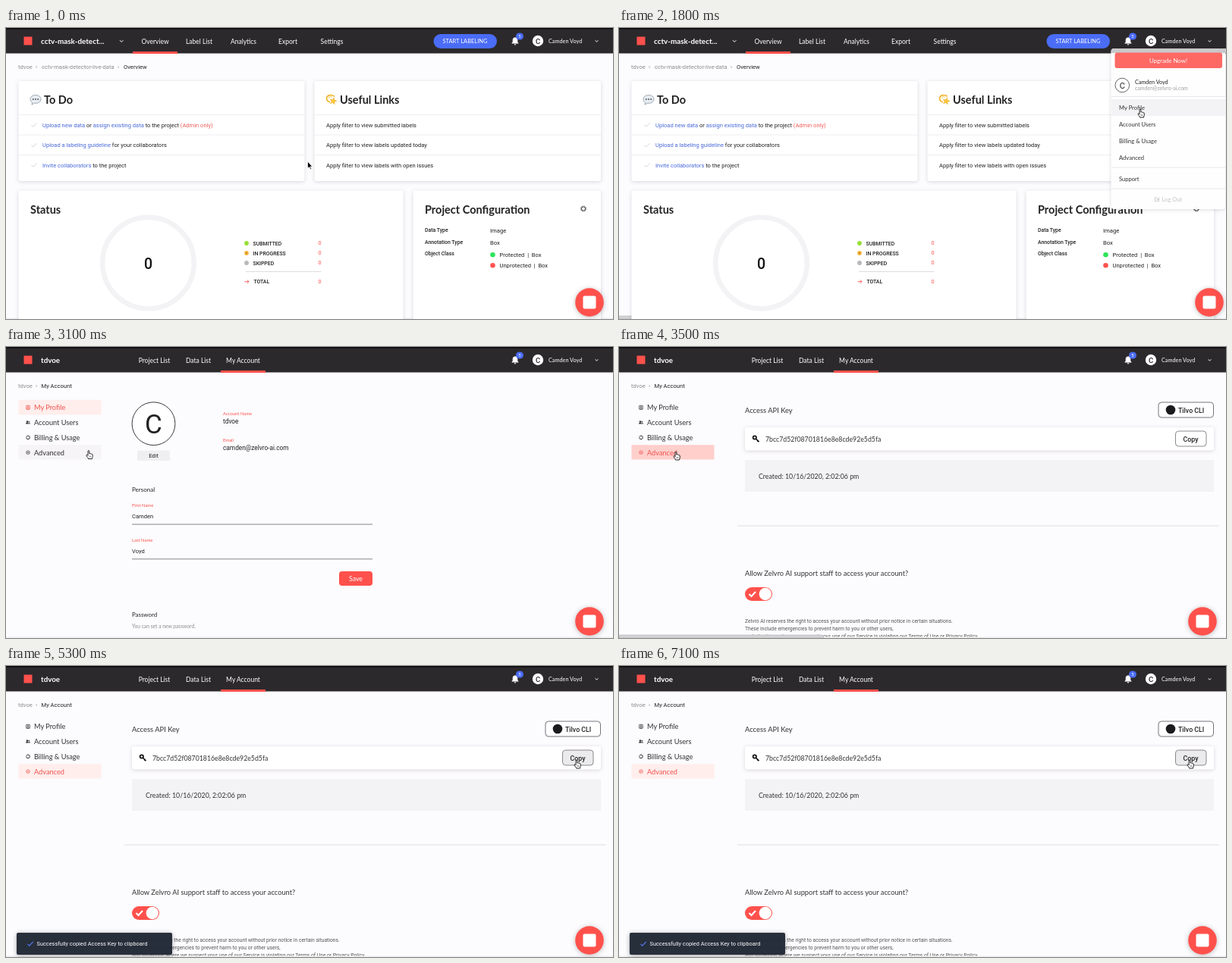
Recreate the animation shown at these times as an HTML page. Size 800 by 384 pixels, loop 7200 ms.

```html
<!DOCTYPE html>
<html lang="en">
<head>
<meta charset="utf-8">
<title>Access key walkthrough</title>
<style>
html, body { margin: 0; width: 100%; height: 100%; overflow: hidden; background: #fcfbfd; }
svg { display: block; width: 800px; height: 384px; }
text { white-space: pre; }
.l { font-family: Lato, sans-serif; }
.r { font-family: Roboto, sans-serif; }
.card { fill: #fff; filter: drop-shadow(0 1px 2.5px rgba(40, 30, 60, .17)); }
</style>
</head>
<body>
<svg id="stage" viewBox="0 0 800 384"></svg>
<script>
const RED = '#ff514c', BLUE = '#4a6cf7', LINK = '#4768d8', INK = '#222', GREY = '#8d8b90';
const PERSON = 'Camden Voyd', USER = 'tdvoe', MAIL = 'camden@zelvro-ai.com', FIRM = 'Zelvro AI';

// y is the middle of the capitals
const text = (cls, x, y, s, size, fill = INK, more = '') =>
  `<text class="${cls}" x="${x}" y="${(y + size * .36).toFixed(2)}" font-size="${size}" fill="${fill}" ${more}>${s}</text>`;
const lato = (...a) => text('l', ...a);
const robo = (...a) => text('r', ...a);
const MID = 'text-anchor="middle"', BOLD = 'font-weight="700"', MED = 'font-weight="500"';
const rect = (x, y, w, h, fill, r = 0, more = '') =>
  `<rect x="${x}" y="${y}" width="${w}" height="${h}" rx="${r}" fill="${fill}" ${more}/>`;
const card = (x, y, w, h, r = 3) => rect(x, y, w, h, '#fff', r, 'class="card"');
const circ = (x, y, r, fill, more = '') => `<circle cx="${x}" cy="${y}" r="${r}" fill="${fill}" ${more}/>`;
const path = (d, stroke, w = 1, fill = 'none', more = '') =>
  `<path d="${d}" stroke="${stroke}" stroke-width="${w}" fill="${fill}" ${more}/>`;
const rule = (x1, x2, y, color = '#eeedf0') => path(`M${x1} ${y}H${x2}`, color);
const span = (s, fill) => `<tspan fill="${fill}">${s}</tspan>`;
const group = (id, body) => `<g id="${id}">${body}</g>`;
const tabs = (list, on) => list.map(([x, s]) => lato(x, 17.5, s, 8.5, '#fff', MID)).join('') +
  rect(on, 31, 59, 3, RED);

function header() {
  return rect(0, 0, 800, 33.5, '#2c292c') + rect(0, 0, 800, 1.5, '#08070a') +
    rect(23.5, 11.5, 11, 11, RED) +
    path('M666.5 20.5V20l1.2-1.4V16q0-3.3 3.3-3.8 3.3.5 3.3 3.8v2.6l1.2 1.4v.5Z', 'none', 0, '#fff') +
    path('M669.6 21.2h2.8q-.3 1.3-1.4 1.3t-1.4-1.3Z', 'none', 0, '#fff') +
    rect(672, 6.5, 10, 9, BLUE, 4.5) + lato(677, 11, '5', 6, '#fff', MID) +
    circ(701, 17, 7.2, '#fff') + robo(701, 17.1, 'C', 9.5, INK, MID + MED) +
    lato(715, 17.5, PERSON, 7.3, '#fff') + path('M776.6 16.3l1.9 1.9 1.9-1.9', '#fff');
}

function bubble() {
  return path('M39 88.5c4 0 7 2.3 7 5.4s-3 5.4-7 5.4l-1.7-.1-3.3 2 .6-2.9c-1.700-1-2.600-2.500-2.600-4.400 0-3.100 3-5.400 7-5.400Z',
    '#8b97a3', .8, '#e8edf2') + [35.8, 39, 42.2].map(x => circ(x, 94, 1.05, '#56606a')).join('');
}

function dizzy() {
  let d = '';
  for (let i = 0; i < 10; i++) {
    const a = i * Math.PI / 5 - 1.35, r = i % 2 ? 2.1 : 4.8;
    d += `${i ? 'L' : 'M'}${(431.2 + r * Math.cos(a)).toFixed(1)} ${(96.5 + r * Math.sin(a)).toFixed(1)}`;
  }
  return path('M433 90.500c-3-3-9-2.500-10.200 1-.8 3 1.200 5.500 4.200 6.500', '#f2b632', 1.7) +
    path('M430 91.500c-2-1.300-4.500-.8-4.700 1', '#f6d371', 1.2) + path(d + 'Z', '#e2a42c', .5, '#fbc93b');
}

function overview() {
  const todo = [
    span('Upload new data', LINK) + ' or ' + span('assign existing data', LINK) + ' to the project ' + span('(Admin only)', '#ee5b58'),
    span('Upload a labeling guideline', LINK) + ' for your collaborators',
    span('Invite collaborators', LINK) + ' to the project'];
  const links = ['submitted labels', 'labels updated today', 'labels with open issues'];
  const rows = [128, 154.5, 181];
  const states = [['SUBMITTED', '#98df35'], ['IN PROGRESS', '#f7b742'], ['SKIPPED', '#b9b8bc']];
  const config = [['Data Type', 'Image'], ['Annotation Type', 'Box'], ['Object Class', '']];
  const classes = [['Protected', '#2fe45b'], ['Unprotected', '#ff5451']];
  return lato(46, 17.5, 'cctv-mask-detect...', 9.9, '#fff', BOLD) +
    path('M150 16.200l2.200 2.200 2.200-2.200', '#fff') +
    tabs([[196.5, 'Overview'], [254.5, 'Label List'], [313, 'Analytics'], [371.5, 'Export'], [429.5, 'Settings']], 167) +
    rect(563.5, 8, 83.5, 19, BLUE, 9.5) + lato(605, 17.5, 'START LABELING', 7.5, '#fff', MID) +
    robo(16, 51.5, USER, 7.6, GREY) + robo(39, 51, '›', 7.6, GREY) +
    robo(47, 51.5, 'cctv-mask-detector-live-data', 7.6, GREY) + robo(147, 51, '›', 7.6, GREY) +
    robo(155, 51.5, 'Overview', 7.6) +
    card(16.5, 70, 377, 132) + card(406.5, 70, 377.5, 132) +
    bubble() + lato(50, 95, 'To Do', 14.5, INK, BOLD) +
    dizzy() + lato(440, 95, 'Useful Links', 14.5, INK, BOLD) +
    rows.map((y, i) => rule(16.5, 393.5, y - 13.5) + rule(406.5, 784, y - 13.5) +
      path(`M33.500 ${y}l2.300 2.300 4.700-4.700`, '#d5d4d8') + robo(48, y, todo[i], 7.55) +
      robo(422, y, 'Apply filter to view ' + links[i], 7.55)).join('') +
    card(16.5, 214.5, 507, 190) + card(536.5, 214.5, 247.5, 190) +
    lato(32, 239.5, 'Status', 14.5, INK, BOLD) +
    circ(187.5, 310, 60.3, 'none', 'stroke="#f3f3f5" stroke-width="6.5"') +
    robo(187.5, 311, '0', 19.5, '#111', MID + MED) +
    states.map(([s, c], i) => circ(317, 284 + i * 13, 2.9, c) +
      robo(325.5, 284.3 + i * 13, s, 6.9, INK, MED) + robo(413.5, 283.7 + i * 13, '0', 7.2, RED, MID)).join('') +
    circ(317, 297, 1, '#b5781b') + rule(316, 415.5, 321.5, '#dddce0') +
    path('M314.500 334.700h5.500m-2.200-2.200 2.200 2.200-2.200 2.200', RED, .9) +
    robo(326.5, 335, 'TOTAL', 6.9, INK, MED) + robo(413.5, 334.7, '0', 7.2, RED, MID) +
    lato(552, 239.5, 'Project Configuration', 14.5, INK, BOLD) +
    circ(761, 238.5, 2.6, 'none', 'stroke="#666" stroke-width="1.300"') +
    circ(761, 238.5, 3.6, 'none', 'stroke="#666" stroke-width="1" stroke-dasharray="1.400 1.427"') +
    config.map(([k, v], i) => robo(552, 266.8 + i * 15.6, k, 6.9, INK, MED) + robo(638, 267.7 + i * 15.6, v, 7.7)).join('') +
    classes.map(([s, c], i) => circ(641.5, 299.2 + i * 14, 3.3, c) +
      robo(650.5, 299.4 + i * 14, s + '\u00a0 |\u00a0 Box', 7.6)).join('');
}

function menu() {
  const items = [['My Profile', 105.5], ['Account Users', 127.5], ['Billing & Usage', 149.5], ['Advanced', 171.5], ['Support', 198.8]];
  return rect(648.5, 27, 150.5, 212, '#fff', 4, 'class="card" fill-opacity=".96"') +
    path('M648.500 33v-2q0-4 4-4H800v6Z', 'none', 0, '#c9c8ca') +
    rect(653.5, 32.5, 141.5, 20.5, '#ff6964', 3) + lato(724, 43, 'Upgrade Now!', 7.9, '#fff', MID) +
    circ(663.3, 75.5, 9.3, '#fff', 'stroke="#555" stroke-width=".9"') + robo(663.3, 75.6, 'C', 11, INK, MID) +
    lato(680, 71, PERSON, 7.2) + lato(680, 80, MAIL, 6.9, '#a09fa3') +
    rule(648.5, 799, 90.5, '#e8e7ea') + rect(649, 94, 150, 22, '#f3f2f4', 0, 'id="pick"') +
    items.map(([s, y]) => lato(659, y, s.replace('&', '&amp;'), 7.6, '#333')).join('') +
    rule(648.5, 799, 184, '#e8e7ea') + rule(648.5, 799, 212, '#e8e7ea') +
    path('M709 223.500h-2.500v5h5v-5M708 226h3m-1.200-1.200 1.200 1.200-1.200 1.200', '#c4c3c7', .8) +
    lato(715.5, 226.3, 'Log Out', 7.6, '#c4c3c7');
}

const SIDE = ['My Profile', 'Account Users', 'Billing & Usage', 'Advanced'];
const sideY = i => 79.8 + i * 19.8;

function account() {
  return lato(46, 17.5, USER, 9.8, '#fff', BOLD) +
    tabs([[195.5, 'Project List'], [253.5, 'Data List'], [312.5, 'My Account']], 283) +
    robo(16, 51.5, USER, 7.6, GREY) + robo(39, 51, '›', 7.6, GREY) + robo(46.5, 51.5, 'My Account', 7.6) +
    group('side', '');
}

function sidebar(on, hover) {
  return SIDE.map((s, i) => {
    const y = sideY(i), c = i === on ? '#f0534f' : '#333';
    const bg = i === on ? (i === hover ? '#ffcfcc' : '#ffeeec') : i === hover ? '#f6f4f6' : '';
    const icon = [
      rect(26.7, y - 2.5, 4.6, 5, 'none', .5, `stroke="${c}" stroke-width=".8"`) + circ(29, y - .6, .9, c) + rect(27.6, y + .8, 2.8, 1, c),
      circ(28, y - 1.1, 1.2, c) + circ(30.4, y - 1, .9, c) + path(`M26 ${y + 2}q0-2 2-2t2 2Zm4.500 0h1.500q0-1.600-1.800-1.800Z`, 'none', 0, c),
      circ(29, y, 2.3, 'none', `stroke="${c}" stroke-width="1" stroke-dasharray="6.500 .7"`),
      circ(29, y, 2.3, 'none', `stroke="${c}" stroke-width=".7"`) + path(`M27.600 ${y}h2.800`, c, .9)][i];
    return (bg ? rect(16.5, y - 10, 109, 19.4, bg, 1) : '') + icon + lato(37, y + .3, s.replace('&', '&amp;'), 9.2, c);
  }).join('');
}

function profile() {
  const field = (y, k, v) => lato(166, y, k, 5.9, RED) + robo(166, y + 14.5, v, 7.6) + rule(166, 483, y + 25.3, '#858388');
  const [first, last] = PERSON.split(' ');
  return circ(194.5, 101.2, 28.4, '#fff', 'stroke="#3c3a3e" stroke-width="1" class="ring"') +
    robo(194.5, 101.4, 'C', 35, INK, MID) +
    rect(173, 136.5, 43, 13.5, '#efeef1', 1.5) + robo(194.5, 143.3, 'Edit', 7.5, INK, MID) +
    lato(286, 87.5, 'Account Name', 5.9, RED) + robo(286, 98.3, USER, 8.3) +
    lato(286, 122.5, 'Email', 5.9, RED) + robo(286, 133, MAIL, 8.3) +
    lato(166, 188, 'Personal', 8) + field(208.7, 'First Name', first) + field(254.5, 'Last Name', last) +
    rect(439, 296, 44, 19, RED, 4, 'class="save"') + lato(461, 306, 'Save', 8.8, '#fff', MID) +
    lato(166, 353.3, 'Password', 7.9) + lato(166, 368.5, 'You can set a new password.', 6.7, GREY);
}

function advanced() {
  const note = [`${FIRM} reserves the right to access your account without prior notice in certain situations.`,
    'These include emergencies to prevent harm to you or other users,',
    'and situations where we suspect your use of our Service is violating our Terms of Use or Privacy Policy.'];
  return lato(166, 84, 'Access API Key', 9.4, '#333') +
    rect(711, 73, 72.5, 20, '#fff', 4, 'stroke="#77757a"') + circ(727, 83, 6.3, '#1b1a1c') +
    robo(737, 83.5, 'Tilvo CLI', 8.8, INK, MED) +
    card(166, 106, 618, 30.5) +
    circ(178.8, 119.5, 2.2, 'none', 'stroke="#111" stroke-width="1.700"') + path('M180.300 121l4.200 4.200m-2.300-.5 1.400-1.400', '#111', 1.7) +
    lato(193, 122, '7bcc7d52f08701816e8e8cde92e5d5fa', 8.75, '#333') +
    rect(733.5, 111, 40.5, 20, '#fff', 4, 'id="copy" stroke="#8b898e"') + robo(753.5, 121.5, 'Copy', 8.8, INK, MID + MED) +
    rect(166, 149, 618, 42, '#f3f2f4', 1) + lato(184, 171, 'Created: 10/16/2020, 2:02:06 pm', 8.8, '#333') +
    rule(156, 791, 236, '#dfdee1') +
    lato(166, 298.3, `Allow ${FIRM} support staff to access your account?`, 9.3, '#333') +
    rect(166, 317, 36, 18, RED, 9) + circ(192.8, 326, 8.2, '#fff') + path('M171.500 326l3 3 5.500-6', '#fff', 2.1) +
    note.map((s, i) => robo(166, 361.2 + i * 10, s, 6.75, '#555')).join('');
}

const ARROW = path('M0 0V9.200L2.100 7.400 3.600 10.600 5 10 3.600 6.900H6.300Z', '#fff', .8, '#000', 'stroke-linejoin="round"');
const HAND = path('M-.9 1Q-.9 0 0 0T.9 1V4Q1.700 3.400 2.500 4.200 3.300 3.800 3.900 4.700 5.300 4.500 5.300 5.900V7.800Q5.300 9 4.600 9.900V11H-.5V10.200Q-1.500 9.300-2.900 6.700-3.200 5.900-2.500 5.700-1.800 5.500-.9 6.700Z',
  '#111', .9, '#fff', 'stroke-linejoin="round"') + path('M1.200 7v2M2.800 7v2', '#111', .5);

const stage = document.getElementById('stage');
stage.innerHTML = rect(0, 0, 800, 384, '#fcfbfd') +
  group('overview', '') + group('account', '') + group('profile', profile()) + group('advanced', advanced()) +
  rect(0, 382.5, 800, 1.5, '#efeef0') +
  group('status', path('M0 380H267q3 0 3 4H0Z', '#b5b4b8', .6, '#d3d2d5')) +
  group('toast', rect(14, 352, 205, 29, '#232b38', 2, 'style="filter:drop-shadow(0 1px 3px rgba(0,0,0,.35))"') +
    path('M28.500 366.800l2.300 2.300 5-5.300', '#5376f5', 1.2) + robo(40.5, 366.8, 'Successfully copied Access Key to clipboard', 7.4, '#fff')) +
  group('top', header()) + group('heads', '') + group('menu', menu()) +
  group('chat', circ(769, 362, 18.8, RED, 'style="filter:drop-shadow(0 1px 3px rgba(0,0,0,.25))"') + rect(760.5, 353.5, 17, 17, '#fff', 2)) +
  group('arrow', ARROW) + group('hand', HAND);

const el = id => document.getElementById(id);
// page groups carry their own header text, so they sit above the bar
el('top').after(el('overview'), el('account'));
el('overview').innerHTML = overview();
el('account').innerHTML = account();

const show = (id, on) => el(id).setAttribute('display', on ? 'inline' : 'none');
const move = (id, x, y) => el(id).setAttribute('transform', `translate(${x.toFixed(1)} ${y.toFixed(1)})`);
const ramp = (t, a, b) => Math.min(1, Math.max(0, (t - a) / (b - a)));
const ease = u => u * u * (3 - 2 * u);

// start, end, target x, target y, upward bow
const MOVES = [[100, 800, 778, 17, 0], [1000, 1600, 687, 107, 0], [1900, 2200, 686.5, 112.5, 0],
  [2500, 3200, 75, 138, 0], [4000, 4872, 752, 124, 21]];

function pointer(t) {
  let x = 397.5, y = 176;
  for (const [a, b, tx, ty, bow] of MOVES) {
    const e = ease(ramp(t, a, b));
    x += (tx - x) * e;
    y += (ty - y) * e - bow * Math.sin(Math.PI * e);
  }
  return [x, y];
}

function draw(t) {
  const [x, y] = pointer(t);
  const home = t < 2000, adv = t >= 3400, open = t >= 800 && home;
  const inSide = !home && x > 16 && x < 126;
  const hover = inSide ? SIDE.findIndex((_, i) => Math.abs(y - sideY(i)) < 9.9) : -1;
  const onCopy = adv && x > 733 && x < 774 && y > 111 && y < 131;
  const onItem = open && t >= 1500;

  show('overview', home);
  show('account', !home);
  show('profile', !home && !adv);
  show('advanced', adv);
  if (!home) el('side').innerHTML = sidebar(adv ? 3 : 0, hover);

  show('menu', open);
  el('menu').setAttribute('opacity', .65 + .35 * ramp(t, 800, 900));
  show('pick', onItem);
  move('chat', open ? 9 : 0, 0);
  show('status', t >= 1700 && t < 2600 || t >= 3200 && t < 4100);
  el('copy').setAttribute('fill', onCopy ? '#ebeaec' : '#fff');

  const pop = ease(ramp(t, 5000, 5300));
  show('toast', pop > 0);
  el('toast').setAttribute('opacity', pop * .98);
  move('toast', 0, 12 * (1 - pop));

  const hand = hover >= 0 || onCopy || onItem;
  show('arrow', !hand);
  show('hand', hand);
  move(hand ? 'hand' : 'arrow', x, y);
}

const begin = performance.now();
function tick() {
  const t = (performance.now() - begin) % 7200;
  draw(Math.floor(t / 100) * 100);
  requestAnimationFrame(tick);
}
draw(0);
requestAnimationFrame(tick);
</script>
</body>
</html>
```
